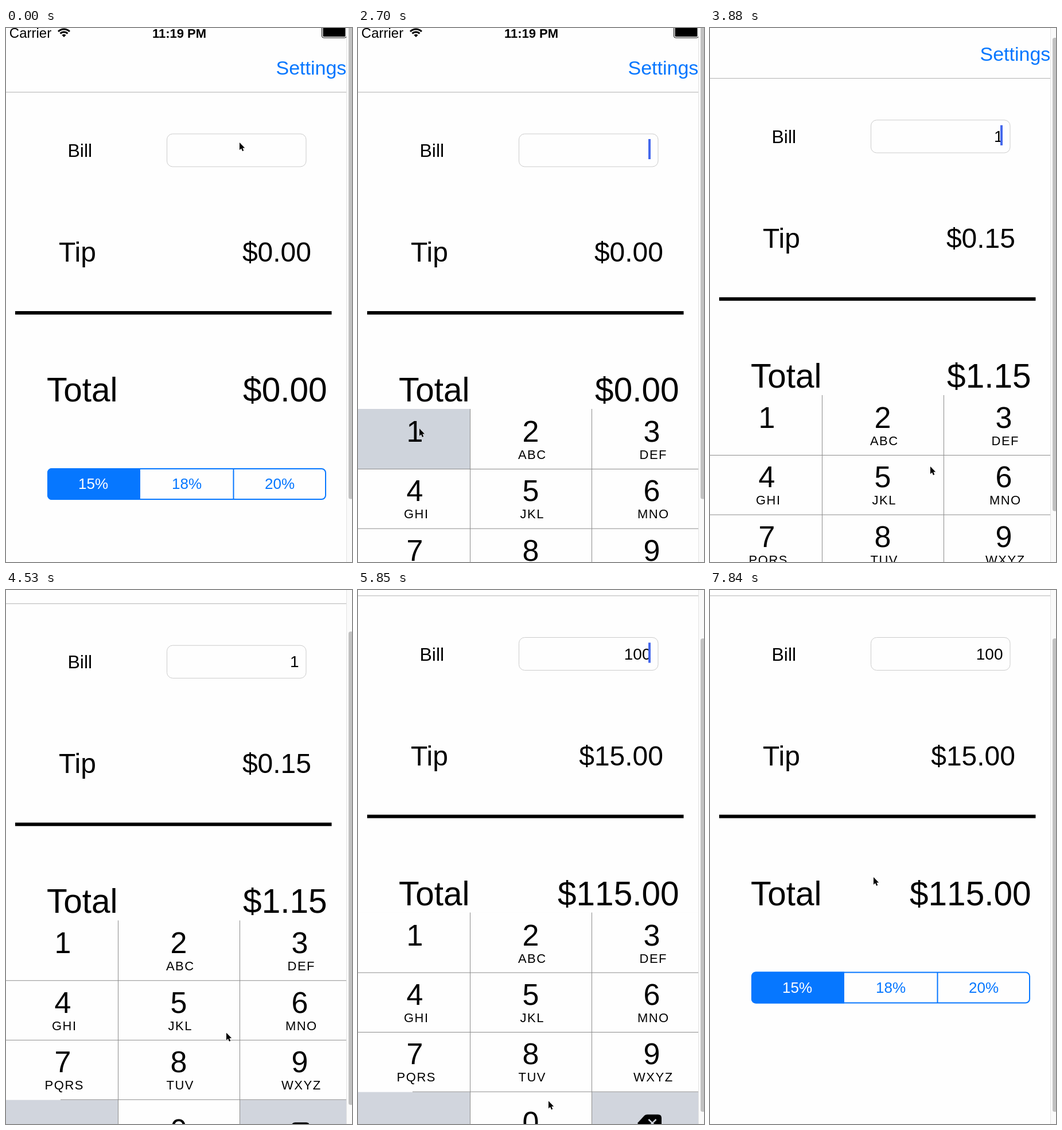
An HTML page for the animation above (7.99 s loop, 603 px wide and 928 px high).

```html
<!DOCTYPE html>
<html lang="en">
<head>
<meta charset="utf-8">
<title>Tip calculator</title>
<style>
  html, body { margin: 0; width: 100%; height: 100%; overflow: hidden; background: #fefefe; }
  svg { display: block; width: 100%; height: 100%; }
  text { font-family: "Liberation Sans", Arial, sans-serif; }
  .mid { text-anchor: middle; }
  .end { text-anchor: end; font-kerning: none; }
  .letters { font-size: 22px; letter-spacing: 1.5px; }
</style>
</head>
<body>
<svg viewBox="0 0 603 928">
  <rect width="603" height="928" fill="#fefefe"/>
  <g id="page">
    <text x="5.8" y="17" font-size="24">Carrier</text>
    <g fill="none" stroke="#000" stroke-width="3">
      <path d="M91.1 6.1A14 14 0 0 1 110.9 6.1M94.6 9.6A9 9 0 0 1 107.4 9.6"/>
      <path d="M101 16l-3.6-3.8a5 5 0 0 1 7.2 0z" fill="#000" stroke="none"/>
    </g>
    <text class="mid" x="302" y="17" font-size="22" font-weight="bold">11:19 PM</text>
    <rect x="550.5" y="-4.5" width="43" height="21.5" rx="3" fill="#fefefe" stroke="#000"/>
    <rect x="552.5" y="-2" width="39" height="17" rx="1.5"/>

    <text x="470.5" y="81" font-size="34" fill="#0677ff">Settings</text>
    <rect y="111" width="593" height="1" fill="#b2b2b2"/>

    <text x="107.5" y="224" font-size="32">Bill</text>
    <rect x="280.5" y="184" width="242.5" height="57" rx="10" fill="#fefefe" stroke="#ccc"/>
    <text id="bill" class="end" x="510.5" y="222" font-size="28"></text>
    <rect id="caret" x="506" y="193" width="4" height="35" fill="#4568ec"/>

    <text x="92" y="406" font-size="48">Tip</text>
    <text id="tip" class="end" x="532" y="406" font-size="48"></text>
    <rect x="16" y="492" width="551.5" height="6"/>
    <text x="71" y="649" font-size="58.5">Total</text>
    <text id="total" class="end" x="559.5" y="649" font-size="58.5"></text>

    <g fill="#0677ff" font-size="26" class="mid">
      <path d="M80 765H234V820H80a8 8 0 0 1-8-8V773a8 8 0 0 1 8-8z"/>
      <rect x="73" y="766" width="484" height="53" rx="7" fill="none" stroke="#0677ff" stroke-width="2"/>
      <rect x="395.5" y="766" width="2" height="53"/>
      <text x="152" y="801" fill="#fefefe">15%</text>
      <text x="315" y="801">18%</text>
      <text x="477" y="801">20%</text>
    </g>

    <g id="keyboard">
      <rect y="662" width="593" height="432" fill="#fefefe"/>
      <path d="M0 974H195.5V1094H0zM407.5 974H593V1094H407.5z" fill="#d1d5dd"/>
      <rect id="key1" y="662" width="195.5" height="104" fill="#cfd4dc"/>
      <rect id="key0" x="195.5" y="974" width="212" height="120" fill="#cfd4dc"/>
      <path d="M195.5 662V1094M407.5 662V1094M0 766.5H593M0 870H593M95 973.5H593" fill="none" stroke="#8c8c8c"/>
      <g id="digits" class="mid" font-size="52"></g>
      <path d="M487 1028L499 1015Q501 1013 504 1013H523Q529 1013 529 1019V1037Q529 1043 523 1043H504Q501 1043 499 1041z"/>
      <path d="M506.5 1021.5l13 13m0-13l-13 13" stroke="#d1d5dd" stroke-width="2.5"/>
    </g>
  </g>

  <rect x="593" width="10" height="928" fill="#fafafa"/>
  <rect x="593" width="1" height="928" fill="#e4e4e4"/>
  <rect id="thumb" x="597" width="9" height="822.5" rx="3.5" fill="#c1c1c1"/>
  <path id="cursor" d="M1 1V14L4 11.2 6 16 8.3 15 6.3 10.4H10.2z" stroke="#fff" paint-order="stroke"/>
</svg>
<script>
const LOOP = 7990, REFRESH = 146.6;
const FOCUS = 820, BLUR = 7340, BLINK = 900;
const KEYBOARD_HEIGHT = 432, SCROLL = 101.5;

const [page, bill, caret, tip, total, keyboard, key1, key0, thumb, cursor] =
  'page bill caret tip total keyboard key1 key0 thumb cursor'.split(' ')
    .map(id => document.getElementById(id));

const letters = ['', 'ABC', 'DEF', 'GHI', 'JKL', 'MNO', 'PQRS', 'TUV', 'WXYZ'];
document.getElementById('digits').innerHTML = letters.map((label, i) => {
  const x = [99, 301, 512][i % 3], y = 719 + 103.4 * Math.floor(i / 3);
  return `<text x="${x}" y="${y}">${i + 1}</text>
    <text class="letters" x="${x + 2.8}" y="${y + 30}">${label}</text>`;
}).join('') + '<text x="301" y="1044">0</text>';

const taps = [
  { at: 2780, digit: '1', key: key1 },
  { at: 5500, digit: '0', key: key0 },
  { at: 5700, digit: '0', key: key0 }
];

// Each move runs from one time to another and ends at x, y.
const home = { x: 406, y: 198 };
const moves = [
  { from: 0, to: 380, x: 369, y: 233 },
  { from: 820, to: 1320, x: 351, y: 415 },
  { from: 1320, to: 2500, x: 106, y: 695 },
  { from: 2780, to: 3400, x: 383, y: 761 },
  { from: 3880, to: 4500, x: 383, y: 769 },
  { from: 5000, to: 5400, x: 331, y: 887 },
  { from: 5800, to: 6400, x: 227, y: 640 },
  { from: 6400, to: 7030, x: 284, y: 498 }
];

const clamp = v => Math.min(1, Math.max(0, v));
const progress = (t, from, to) => clamp((t - from) / (to - from));
const smooth = p => p * p * (3 - 2 * p);
const easeOut = p => 1 - (1 - p) ** 2;
const place = (node, x, y) => node.setAttribute('transform', `translate(${x} ${y})`);
const fade = (node, opacity) => node.setAttribute('opacity', opacity);

function pointerAt(t) {
  return moves.reduce((p, m) => {
    const k = smooth(progress(t, m.from, m.to));
    return { x: p.x + (m.x - p.x) * k, y: p.y + (m.y - p.y) * k };
  }, home);
}

function caretOpacity(t, typed) {
  if (t < FOCUS || t > BLUR) return 0;
  const phase = (t - (typed.at(-1)?.at ?? FOCUS)) % BLINK;
  return clamp((550 - phase) / 100);
}

function draw(time) {
  const t = Math.floor(time / REFRESH) * REFRESH;
  const scroll = SCROLL * easeOut(progress(t, 3665, 4825));
  const raised = easeOut(progress(t, FOCUS, FOCUS + 300)) - smooth(progress(t, BLUR, BLUR + 360));
  const pointer = pointerAt(t);
  const typed = taps.filter(tap => tap.at <= t);
  const pressed = taps.find(tap => t > tap.at - 160 && t < tap.at);
  const amount = typed.map(tap => tap.digit).join('');

  place(page, 0, -scroll);
  place(thumb, 0, -4 + scroll * .87);
  place(keyboard, 0, KEYBOARD_HEIGHT * (1 - raised));
  place(cursor, pointer.x, pointer.y);
  fade(caret, caretOpacity(t, typed));
  for (const key of [key1, key0]) fade(key, pressed?.key === key ? 1 : 0);
  bill.textContent = amount;
  tip.textContent = '$' + (amount * .15).toFixed(2);
  total.textContent = '$' + (amount * 1.15).toFixed(2);
}

const start = performance.now();
function tick() {
  draw((performance.now() - start) % LOOP);
  requestAnimationFrame(tick);
}
tick();
</script>
</body>
</html>
```
